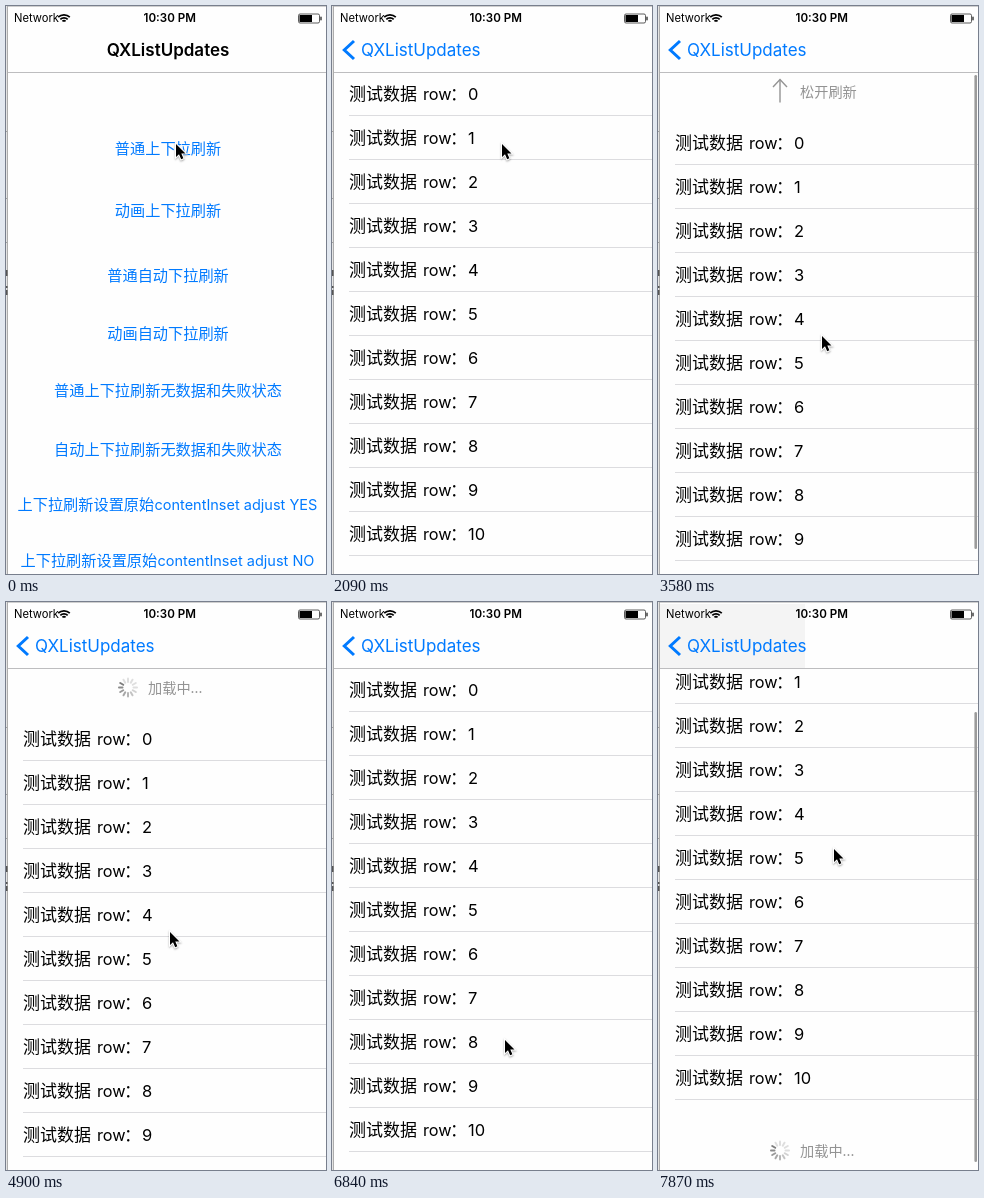
Write an HTML page with a canvas that moves like this. It is 320x568 px and loops after 8000 ms.

```html
<!DOCTYPE html>
<html lang="zh-CN">
<head>
<meta charset="utf-8">
<style>
html, body { margin: 0; width: 100%; height: 100%; overflow: hidden; background: #fefefe; }
canvas { display: block; width: 320px; height: 568px; }
</style>
</head>
<body>
<canvas id="stage"></canvas>
<script>
const W = 320, H = 568, LOOP = 8000;
const FIRST_CHANGE = 1340, TICK = 148.4;
const BLUE = '#007aff', GRAY = '#939393', PAPER = '#fefefe';
const TITLE = 'QXListUpdates';
const LATIN = 'Inter, sans-serif';
const HAN = '"Noto Sans CJK SC", "Noto Sans CJK", sans-serif';

const canvas = document.getElementById('stage');
const ctx = canvas.getContext('2d');
const ratio = window.devicePixelRatio || 1;
canvas.width = W * ratio;
canvas.height = H * ratio;

// [text, centre y, optional Latin tail, optional left edge]
const MENU = [
  ['普通上下拉刷新', 142],
  ['动画上下拉刷新', 204.5],
  ['普通自动下拉刷新', 269.5],
  ['动画自动下拉刷新', 327.5],
  ['普通上下拉刷新无数据和失败状态', 384.5],
  ['自动上下拉刷新无数据和失败状态', 443.5],
  ['上下拉刷新设置原始', 498.5, 'contentInset adjust YES', 11.5],
  ['上下拉刷新设置原始', 554.5, 'contentInset adjust NO', 14.5]
];

// Keys are [tick, value]; ticks count from the tap on the first menu item.
const PUSH = [[0, 0], [1, .3], [2, .68], [3, .9], [4, .98], [5, 1]];
const PULL = [[8, 0], [9, 4], [10, 20], [11, 62], [12, 87], [14, 87], [15, 49], [30, 49], [31, 30],
  [32, 14], [33, 3], [34, 0], [38, 0], [39, -75], [40, -100], [41, -100], [42, -80], [43, -57], [44, -52]];
const CURSOR_X = [[8, 170], [12, 164], [34, 164], [38, 176]];
const CURSOR_Y = [[8, 138], [9, 146], [10, 182], [11, 272], [12, 330], [34, 330], [38, 474], [39, 300], [40, 247]];
const ITEM_ALPHA = [[-1, 1], [0, .25], [1, .35], [2, .5], [3, 1]];

const clamp = v => Math.max(0, Math.min(1, v));

function at(keys, k) {
  if (k <= keys[0][0]) return keys[0][1];
  for (let i = 1; i < keys.length; i++) {
    const [a, from] = keys[i - 1], [b, to] = keys[i];
    if (k <= b) return from + (to - from) * (k - a) / (b - a);
  }
  return keys[keys.length - 1][1];
}

function rect(x, y, w, h, color) {
  ctx.fillStyle = color;
  ctx.fillRect(x, y, w, h);
}

function text(str, x, y, font, color, align = 'left') {
  ctx.font = font;
  ctx.fillStyle = color;
  ctx.textAlign = align;
  ctx.fillText(str, x, y);
}

function line(points, width, color) {
  ctx.beginPath();
  points.forEach(([x, y]) => ctx.lineTo(x, y));
  ctx.lineWidth = width;
  ctx.strokeStyle = color;
  ctx.stroke();
}

function withAlpha(alpha, draw) {
  ctx.save();
  ctx.globalAlpha = clamp(alpha);
  draw();
  ctx.restore();
}

function drawMenu(push, k) {
  ctx.save();
  ctx.translate(-97 * push, 0);
  MENU.forEach(([label, y, tail, left], i) => {
    withAlpha(i ? 1 : at(ITEM_ALPHA, k), () => {
      const font = '15.2px ' + HAN;
      if (!tail) return text(label, 162, y + 5.5, font, BLUE, 'center');
      text(label, left, y + 5.5, font, BLUE);
      text(tail, left + 137, y + 5.2, '14.5px ' + LATIN, BLUE);
    });
  });
  ctx.restore();
  rect(0, 0, W, H, `rgba(0,0,0,${.1 * push})`);
}

function drawSpinner(x, y, t) {
  const lead = Math.floor(t / (1000 / 12));
  ctx.lineCap = 'round';
  for (let i = 0; i < 12; i++) {
    const age = ((lead - i) % 12 + 12) % 12;
    const shade = Math.min(222, 125 + age * 14);
    const dx = Math.sin(i * Math.PI / 6), dy = -Math.cos(i * Math.PI / 6);
    line([[x + dx * 5.5, y + dy * 5.5], [x + dx * 9, y + dy * 9]], 2, `rgb(${shade},${shade},${shade})`);
  }
  ctx.lineCap = 'butt';
}

function drawArrow(x, y, dir) {
  const tip = y + 11.5 * dir;
  line([[x, y - 11.5 * dir], [x, tip]], 1.4, GRAY);
  line([[x - 7, tip - 7.5 * dir], [x, tip], [x + 7, tip - 7.5 * dir]], 1.4, GRAY);
}

function drawRefresh(y, label, dir, loading, t) {
  if (loading) drawSpinner(122, y + .5, t);
  else drawArrow(122, y, dir);
  text(loading ? '加载中...' : label, 142, y + 5.5, '14.2px ' + HAN, GRAY);
}

function drawList(push, k, t) {
  const left = (1 - push) * 318, pull = at(PULL, k);
  ctx.save();
  ctx.translate(left, 0);
  if (push < 1) {
    const shadow = ctx.createLinearGradient(-6, 0, 2, 0);
    shadow.addColorStop(0, 'rgba(0,0,0,0)');
    shadow.addColorStop(1, 'rgba(0,0,0,.1)');
    rect(-6, 66, 8, H, shadow);
  }
  rect(2, 66, W, H, PAPER);
  for (let i = 0; i <= 10; i++) {
    const y = 88 + 44 * i + pull;
    text('测试数据', 17, y + 6.3, '17px ' + HAN, '#000');
    text('row', 91, y + 6, '16.3px ' + LATIN, '#000');
    text('：', 118, y + 6.3, '17px ' + HAN, '#000');
    text(i, 136, y + 6, '16.5px ' + LATIN, '#000');
    rect(17, Math.round(y + 21), W, 1, '#dcdcdf');
  }
  if (k >= 9 && k <= 30) {
    const ready = pull >= 60 || k === 15;
    drawRefresh(36 + pull, ready ? '松开刷新' : '下拉刷新', ready ? -1 : 1, k > 15, t);
  }
  if (k >= 39) drawRefresh(600 + pull, '松开刷新', 1, k >= 43, t);

  const barAlpha = k >= 41 ? 1 : k >= 15 ? 1 - (k - 15) / 3 : 0;
  if (barAlpha > 0) {
    const top = pull < 0 ? 69 - pull * .79 : 69;
    const bottom = pull < 0 ? 560 : H - pull * .51;
    withAlpha(barAlpha, () => {
      ctx.lineCap = 'round';
      line([[317.7, top + 1.3], [317.7, bottom - 1.3]], 2.6, '#9b9b9b');
    });
  }
  ctx.restore();
  return pull;
}

function drawStatus() {
  text('Network', 8, 16.3, '11.2px ' + LATIN, '#000');
  for (const r of [2.2, 5.2, 8.2]) {
    ctx.beginPath();
    ctx.arc(58, 17, r, -Math.PI * .75, -Math.PI * .25);
    ctx.lineWidth = 1.7;
    ctx.strokeStyle = '#000';
    ctx.stroke();
  }
  text('10:30 PM', 163.7, 16.3, '600 11.6px ' + LATIN, '#000', 'center');
  ctx.lineWidth = .8;
  ctx.strokeStyle = '#333';
  ctx.beginPath();
  ctx.roundRect(292.5, 8, 21, 9, 1.5);
  ctx.stroke();
  rect(293.5, 9, 12.5, 7, '#000');
  rect(314.3, 10.7, 1.4, 3.6, '#333');
}

function drawNav(push, pull) {
  rect(0, 0, W, 66, push > 0 && push < 1 ? '#f6f6f6' : PAPER);
  if (pull < -40) rect(2, 2, 145, 64, '#f4f4f4');
  rect(2, 66, W, 1, '#bdbdbf');
  drawStatus();
  withAlpha(1 - 1.2 * push, () =>
    text(TITLE, 162 - 63 * push, 50, '600 17px ' + LATIN, '#000', 'center'));
  withAlpha((push - .65) / .35, () => {
    line([[22, 35], [12.3, 44], [22, 53]], 3, BLUE);
    text(TITLE, 29 + 78 * (1 - push), 50, '17px ' + LATIN, BLUE);
  });
}

function drawWindowEdge() {
  rect(0, 0, W, 1, '#cfcfcf');
  rect(0, 0, 1, H, '#e4e4e4');
  rect(1, 0, 1, H, '#adadad');
  for (const y of [125, 192, 236]) rect(0, y, 1, 1, '#a0a0a0');
  for (const [y, h] of [[264, 6], [280, 2], [284, 5]]) rect(0, y, 1.5, h, '#555');
}

function drawCursor(x, y) {
  ctx.save();
  ctx.translate(x, y);
  ctx.beginPath();
  [[0, 0], [0, 13], [3, 10.3], [5.2, 15.3], [7.4, 14.3], [5.3, 9.5], [9.5, 9.5]]
    .forEach(([px, py]) => ctx.lineTo(px, py));
  ctx.closePath();
  ctx.lineWidth = 2;
  ctx.strokeStyle = '#fff';
  ctx.shadowColor = 'rgba(0,0,0,.35)';
  ctx.shadowBlur = 2 * ratio;
  ctx.shadowOffsetY = ratio;
  ctx.stroke();
  ctx.shadowColor = 'transparent';
  ctx.fillStyle = '#000';
  ctx.fill();
  ctx.restore();
}

function render() {
  const t = performance.now() % LOOP;
  const k = Math.floor((t - FIRST_CHANGE) / TICK + .03);
  const push = at(PUSH, k);
  ctx.setTransform(ratio, 0, 0, ratio, 0, 0);
  rect(0, 0, W, H, PAPER);
  if (push < 1) drawMenu(push, k);
  const pull = push > 0 ? drawList(push, k, t) : 0;
  drawNav(push, pull);
  drawWindowEdge();
  drawCursor(at(CURSOR_X, k), at(CURSOR_Y, k));
  requestAnimationFrame(render);
}
render();
</script>
</body>
</html>
```
